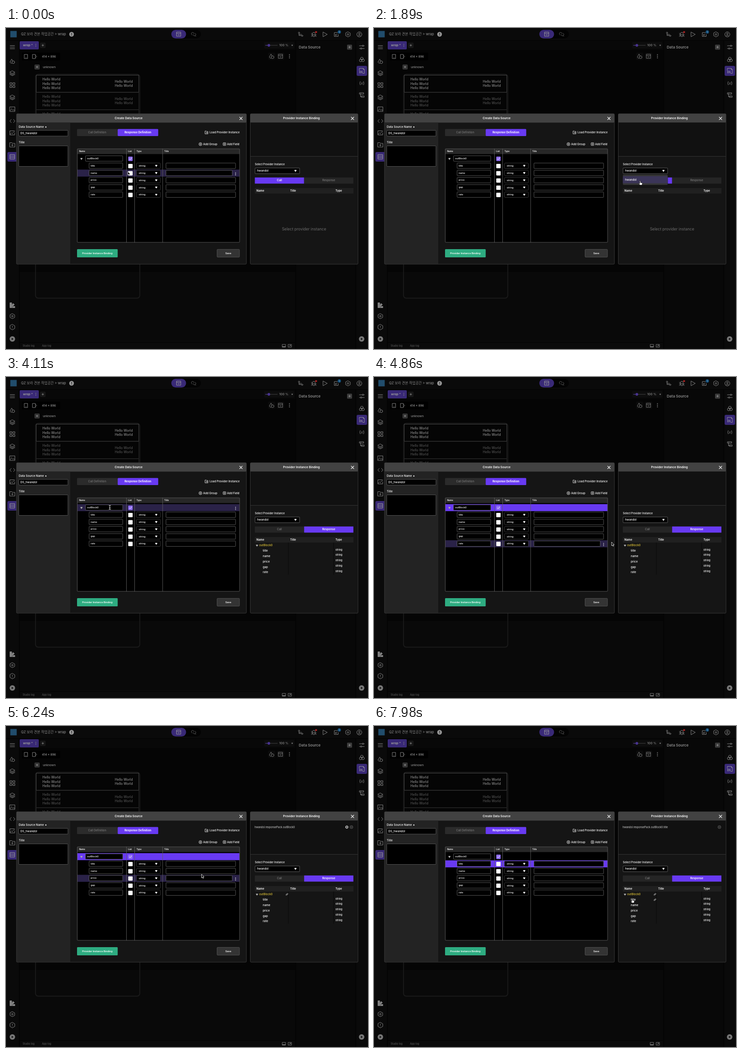
An HTML page for the animation above (8 s loop, 795 by 704 pixels).

```html
<!DOCTYPE html>
<html lang="ko">
<head>
<meta charset="utf-8">
<title>Data source binding</title>
<style>
  html, body { margin: 0; width: 100%; height: 100%; overflow: hidden; background: #070707; }
  svg { display: block; width: 100%; height: 100%; }
  text { font-family: Inter, "Noto Sans CJK KR", "Noto Sans CJK", sans-serif; white-space: pre; }
</style>
</head>
<body>
<svg id="stage" viewBox="0 0 795 704"></svg>
<script>
const stage = document.getElementById('stage');
const LOOP = 8000, STEP = 30, LAG = 60;
const PURPLE = '#683af2', DIM = '#392977', GREY = '#828282', EDGE = '#636363';
const NAME = 'hwandol';
const FIELDS = ['outBlock0', 'title', 'name', 'price', 'gap', 'rate'];

function el(tag, attrs, parent = stage) {
  const node = document.createElementNS('http://www.w3.org/2000/svg', tag);
  for (const k in attrs) node.setAttribute(k, attrs[k]);
  return parent.appendChild(node);
}
const group = (parent) => el('g', {}, parent);
const rect = (x, y, width, height, fill, o = {}, p) => el('rect', { x, y, width, height, fill, ...o }, p);
const circle = (cx, cy, r, fill, o = {}, p) => el('circle', { cx, cy, r, fill, ...o }, p);
const box = (x, y, w, h, fill, stroke, rx = 1, p) => rect(x, y, w, h, fill, { stroke, rx, 'stroke-width': .8 }, p);
const line = (d, stroke = GREY, w = 1, p) => el('path', {
  d, stroke, fill: 'none', 'stroke-width': w, 'stroke-linecap': 'round', 'stroke-linejoin': 'round' }, p);
const icon = (x, y, d, stroke = GREY, w = 1, p) => {
  const n = line(d, stroke, w, p);
  n.setAttribute('transform', `translate(${x} ${y})`);
  return n;
};
// cy is the middle of the capital letters
function text(x, cy, str, size, fill = '#fff', weight = 400, anchor = 'start', p) {
  const n = el('text', { x, y: cy + size * .364, fill, 'font-size': size, 'font-weight': weight, 'text-anchor': anchor }, p);
  n.textContent = str;
  return n;
}
const caretDown = (x, y, fill, p) => el('path', {
  d: 'M-1.6-.9H1.6L0 1.4Z', fill, stroke: fill, 'stroke-width': 1.6, 'stroke-linejoin': 'round',
  transform: `translate(${x} ${y})` }, p);
function dots(x, y, fill, gap, r, p) {
  for (const k of [-1, 0, 1]) circle(x, y + k * gap, r, fill, {}, p);
}
const show = (node, on) => node.setAttribute('visibility', on ? 'visible' : 'hidden');

const SHAPES = 'M-5 1.5L-1.5-5L1 0M5 2A3 3 0 1 1-1 2A3 3 0 1 1 5 2M-5 1.5A3 3 0 0 0-1.5 4.5';
const LAYERS = 'M0-5L5.5-2L0 1L-5.5-2ZM-5.5 .5L0 3.5L5.5 .5M-5.5 2.8L0 5.6L5.5 2.8';
const GEAR = 'M0-5.5L5-2.8V2.8L0 5.5L-5 2.8V-2.8ZM1.7 0A1.7 1.7 0 1 1-1.7 0A1.7 1.7 0 1 1 1.7 0';
const RING = 'M5.5 0A5.5 5.5 0 1 1-5.5 0A5.5 5.5 0 1 1 5.5 0';
const STORE = 'M-4.5-4.5H4.5V4.5H-4.5ZM-4.5-1.5H4.5M-1.5 1.5H1.5';
const PLUS = 'M-2 0H2M0-2V2';
const LINK = 'M-.3-.8L.8-1.9A1 1 0 0 1 2.2-.5L1 .7A1 1 0 0 1-.3 .7M.3 .8L-.8 1.9A1 1 0 0 1-2.2 .5L-1-.7A1 1 0 0 1 .3-.7';

function drawEditor() {
  rect(0, 0, 795, 704, '#0a0a0a');
  rect(30, 28, 605, 507, '#050505');
  rect(30, 28, 605, 20, '#080808');
  rect(30, 535, 605, 155, '#090909');
  rect(637, 28, 131, 676, '#080808');
  for (const x of [29, 636, 768]) rect(x - .5, 28, 1.5, 676, '#020202');
  rect(0, 27, 795, 1, '#020202');
  rect(30, 689, 605, 1, '#020202');

  // top bar
  rect(9.5, 6.5, 14, 14, '#214d6c');
  text(33, 13.5, 'QZ 보라 견본 작업공간 > wrap', 7.5, '#858585', 500);
  circle(144, 13.7, 5.2, '#969696');
  text(144, 13.8, '!', 8, '#111', 700, 'middle');
  rect(363, 4, 65, 19, '#030303', { rx: 9.5 });
  rect(363, 4, 32.5, 19, DIM, { rx: 9.5 });
  icon(379.3, 13.5, STORE, '#999');
  icon(412, 13.5, 'M1-1A3 3 0 1 0-3 2M-1 1A3 3 0 1 0 3-2M2.5 2.5L5 5', '#555');
  icon(647, 14, 'M-3.5-1.5V2.5H2M-3.5 0H2M-2-3.5A1.5 1.5 0 1 1-5-3.5A1.5 1.5 0 1 1-2-3.5M5 3A1.5 1.5 0 1 1 2 3A1.5 1.5 0 1 1 5 3');
  icon(676, 14, 'M-3-1.5A3 3 0 0 1 3-1.5V2A3 3 0 0 1-3 2ZM-5.5-2.5L-3-1M-5.5 4.5L-3 3M5.5 4.5L3 3M-5.5 1H5.5');
  circle(681, 9, 2.3, '#9c2020');
  icon(700.5, 14, 'M-4-5L5 0L-4 5Z');
  icon(726, 14, 'M2-4H-5V4.5H3.5V0M-2 2L1-1M-2.5 0V2H0');
  circle(732, 8.7, 3.6, '#12507e');
  text(732, 8.7, '1', 5, '#aaa', 500, 'middle');
  icon(751, 14, GEAR);
  icon(776, 14, RING + 'M1.8-1.3A1.8 1.8 0 1 1-1.8-1.3A1.8 1.8 0 1 1 1.8-1.3M-3.5 4C-2 1.5 2 1.5 3.5 4');

  // side bars
  icon(14, 42, 'M-5-3.5H5M-5 0H5M-5 3.5H5');
  icon(14, 73, SHAPES);
  icon(14, 99, LAYERS);
  icon(14, 125, 'M-5-5H-1V-1H-5ZM1.5-5H5.5V-1H1.5ZM-5 1.5H-1V5.5H-5ZM1.5 1.5H5.5V5.5H1.5Z');
  icon(14, 152, LAYERS);
  icon(14, 178, 'M-5.5-5H5.5V5H-5.5ZM-5 3L-1.5 0L1 2.5L3 1L5 3M-2-2H-1.5');
  icon(14, 204, 'M-2.5-3.5L-5.5 0L-2.5 3.5M2.5-3.5L5.5 0L2.5 3.5');
  icon(14, 230, 'M4-4.5H-5.5V4.5H5V0M-5 3L-1.5 0L1 2M1 0L5.5-4');
  icon(14, 256, 'M-5.5-4.5H-1L0-3H5.5V5H-5.5ZM-2 1H2M0-1V3');
  rect(3, 272, 23, 21, DIM, { rx: 3 });
  icon(14, 282.5, 'M-5-5H5V5H-5ZM-5-1.6H5M-5 1.7H5', '#9a9a9a');
  icon(14, 608, 'M-5-5.5H-1.5V5.5H-5ZM-.5-1.5L1.5-4L4.5-1.5L-.5 3.5ZM2 2.5H5.5V5.5H-.5Z').setAttribute('fill', GREY);
  icon(14, 632, GEAR);
  icon(14, 656, 'M0-6L5.2-3V3L0 6L-5.2 3V-3ZM0-2.5V.5M0 2.5V2.6');
  for (const x of [14, 781]) {
    circle(x, 682, 6, '#777');
    el('path', { d: `M${x - 1.5} 679.5L${x + 2.5} 682L${x - 1.5} 684.5Z`, fill: '#0a0a0a' });
  }
  icon(781.5, 42, 'M-5.5-3H1M4-3H5.5M-5.5 3H-3M0 3H5.5M4-3A1.5 1.5 0 1 1 1-3A1.5 1.5 0 1 1 4-3M0 3A1.5 1.5 0 1 1-3 3A1.5 1.5 0 1 1 0 3');
  icon(781.5, 69, 'M3-2A3 3 0 1 1-3-2A3 3 0 1 1 3-2M.5 2A3 3 0 1 1-5.5 2A3 3 0 1 1 .5 2M5.5 2A3 3 0 1 1-.5 2A3 3 0 1 1 5.5 2');
  rect(770, 83, 23, 22, DIM, { rx: 3 });
  icon(781.5, 94, 'M-5.5-1V-5.5H3L5.5-3V5.5H2M3-5.5V-3H5.5', '#9a9a9a', .9);
  text(779.5, 96.5, 'DS', 5.5, '#aaa', 600, 'middle');
  text(781.5, 120.5, '(𝑥)', 9, GREY, 500, 'middle');
  icon(781.5, 147, 'M-5-5H4V-2H-5ZM-1 2H5V5H-1ZM-3-2V3.5H-1M-3-3.5H-2.8M1 3.5H1.2');
  text(643, 42.2, 'Data Source', 8.1, '#8c8c8c', 600);
  rect(749, 36.5, 11, 11, '#3c3c3c', { rx: 1.5 });
  icon(754.5, 42, PLUS, '#999');

  // tabs and canvas tools
  rect(30, 29, 42, 18, DIM, { rx: 2 });
  text(37.5, 38, 'wrap *', 6.4, '#999', 700).setAttribute('font-style', 'italic');
  dots(65.5, 38, '#888', 2.5, .8);
  rect(75, 32, 12, 12, '#161616', { rx: 2 });
  icon(80.8, 38, PLUS, '#888');
  rect(567, 31, 66, 14, '#0d0d0d', { rx: 2 });
  line('M570 38H596', '#444', 1.2);
  line('M570 38H577', '#473290', 1.2);
  circle(577.3, 38, 2.9, '#48338f');
  text(600, 38, '100 %', 6.8, '#888', 500);
  caretDown(628.5, 38, '#777').setAttribute('transform', 'translate(628.5 38) scale(.7)');
  rect(35, 54, 84, 17, '#000', { rx: 2 });
  icon(44, 62.5, 'M-3.5-4.5H3.5V4.5H-3.5ZM-.5 2.7H.5');
  icon(62.5, 62.5, 'M-4-4.5H2V4.5H-4ZM3-2L5 0L3 2');
  text(79, 62.3, '414 × 896', 6.4, '#999', 500);
  for (const x of [583.5, 603]) rect(x - 8, 54, 16, 16, '#0b0b0b', { rx: 2 });
  icon(583.5, 62, SHAPES, GREY, .9);
  icon(603, 62, STORE, GREY, .9);
  dots(622.5, 62, '#8a8a8a', 3.4, 1);

  // phone preview
  rect(62.5, 80, 11.5, 11, '#343434', { rx: 2 });
  icon(68.2, 85.5, PLUS, '#999');
  text(81, 85.3, 'unknown', 6.4, '#8c8c8c', 500);
  rect(64.8, 101.5, 229, 491, 'none', { rx: 6, stroke: '#1a1a1a', 'stroke-width': 2 });
  [['#8d8d8d', '#4a4a4a'], ['#515151', '#2b2b2b'], ['#515151', '#2b2b2b']].forEach(([ink, edge], i) => {
    const y = 103.5 + 38 * i;
    rect(66.5, y, 225, 37.5, 'none', { stroke: edge, 'stroke-width': .9 });
    for (let k = 0; k < 3; k++) text(80, y + 9.4 + 9.2 * k, 'Hello World', 7.1, ink, 500);
    for (let k = 0; k < 2; k++) text(239, y + 14 + 9.2 * k, 'Hello World', 7.1, ink, 500);
  });

  text(36.5, 696.5, 'Studio log', 5.5, '#5e5e5e');
  text(79, 696.5, 'App log', 5.5, '#5e5e5e');
  icon(610.5, 697, 'M-3.5-3H3.5V3H-3.5ZM-3 1.5H3M-3 2.3H3', GREY, .9);
  icon(623.5, 697, 'M-3.5-3H3.5V3H-3.5ZM-1.5 1L1.5-1M.2-1.2H1.7V0', GREY, .9);
}

function drawModal(x, w, title, mid) {
  rect(x, 188, w, 330, '#151515', { rx: 2 });
  rect(x, 188, w, 19.5, '#424242', { rx: 2 });
  text(mid, 197.7, title, 6.5, '#fff', 600, 'middle');
  icon(x + w - 12, 198.3, 'M-2.9-2.9L2.9 2.9M2.9-2.9L-2.9 2.9', '#fff', 1.2);
}
const frameModal = (x, w) => rect(x, 188, w, 330, 'none', { rx: 2, stroke: '#3d3d3d', 'stroke-width': .9 });

const rowTop = i => 278.8 + 15.85 * i;
const rows = [];

function drawSourceModal() {
  drawModal(23, 505, 'Create Data Source', 269.3);
  rect(23, 207.5, 118, 310, '#232323');
  frameModal(23, 505);
  text(28, 216.7, 'Data Source Name', 6.2, '#fff', 500);
  circle(87.5, 217.2, 1.4, '#ddd');
  box(28, 224.5, 108, 12.5, '#000', EDGE);
  text(31.5, 230.8, 'DS_' + NAME, 6.2, '#fff', 500);
  text(28, 251, 'Title', 6.2, '#fff', 500);
  box(28, 258.5, 108, 45, '#000', EDGE);

  rect(156, 221.5, 89.5, 15.5, '#2b2b2b', { rx: 1.5 });
  rect(245.3, 221.5, 89, 15.5, PURPLE, { rx: 1.5 });
  text(200.3, 229, 'Call Definition', 6, '#858585', 400, 'middle');
  text(289.6, 229, 'Response Definition', 6, '#fff', 700, 'middle');
  icon(440.5, 229, 'M-3-3H-1L0-2H3V3.2H-3ZM-1 .7H1.4M.5-.4L1.5 .7L.5 1.7', '#fff', .8);
  text(513, 229, 'Load Provider Instance', 6, '#fff', 500, 'end');
  circle(427, 254.7, 3.3, 'none', { stroke: '#fff', 'stroke-width': .8 });
  icon(427, 254.7, 'M-1.5 0H1.5M0-1.5V1.5', '#fff', .8);
  text(433, 254.5, 'Add Group', 6, '#fff', 500);
  box(476.8, 251.6, 6, 6, 'none', '#fff');
  icon(479.8, 254.6, 'M-1.5 0H1.5M0-1.5V1.5', '#fff', .8);
  text(485.5, 254.5, 'Add Field', 6, '#fff', 500);

  rect(156.5, 265, 356.5, 205, '#000');
  rect(156.5, 265, 356.5, 11.5, '#272727');
  const backs = FIELDS.map((f, i) => rect(156.8, rowTop(i), 356, 15.4, PURPLE));
  for (const x of [264.5, 282.5, 344]) line(`M${x} 265V470`, '#606060', .9);
  box(156.5, 265, 356.5, 205, 'none', '#666');
  [[160.5, 'Name'], [268, 'List'], [286.5, 'Type'], [347.5, 'Title']].forEach(
    ([x, s]) => text(x, 270.6, s, 4.7, '#fff', 600));

  FIELDS.forEach((name, i) => {
    const y = rowTop(i) + 7.5, x = i ? 182.5 : 174.5;
    box(x, y - 6.1, 256.3 - x, 12, '#000', '#6c6c6c');
    const label = text(x + 3.6, y - .3, name, 5.25, '#fff', 500);
    const caret = rect(x + 4, y - 3.3, .7, 6.4, '#fff');
    rect(268.5, y - 4.2, 9.6, 9.6, i ? '#fff' : '#8e6cf6', { rx: 1.4 });
    const row = { back: backs[i], label, caret, more: group() };
    if (i) {
      box(286.5, y - 6, 52.5, 12, '#000', '#484848', 1.5);
      text(291.5, y - .1, 'string', 5.4, '#fff', 500);
      caretDown(330, y - .2, '#fff');
      row.input = box(351.3, y - 6, 152.8, 12, '#000', '#6c6c6c');
    } else {
      icon(273.3, y + .6, 'M-2.5 0L-.7 1.9L2.7-1.9', '#fff', 1);
      caretDown(165.7, y + .5, '#aaa');
    }
    dots(504.2, y + 1.9, '#fff', 2.6, .8, row.more);
    rows.push(row);
  });

  rect(156, 485, 89.3, 18, '#2eac81', { rx: 1.5 });
  text(200.6, 493.8, 'Provider Instance Binding', 5.4, '#fff', 600, 'middle');
  box(463.5, 485.4, 49.3, 17.2, '#343434', '#5a5a5a', 1.5);
  text(488.2, 493.8, 'Save', 5.4, '#fff', 600, 'middle');
}

const ui = {};
function drawTabs(active, p) {
  ['Call', 'Response'].forEach((s, i) => {
    const on = i === active, x = 546.5 + 108.2 * i;
    rect(x, 327.8, 108.2, 13.5, on ? PURPLE : '#252525', {}, p);
    text(x + 54, 334.3, s, 6, on ? '#fff' : '#8a8a8a', on ? 600 : 400, 'middle', p);
  });
}
function drawBound(path, gear) {
  const g = group();
  text(546, 221.7, path, 5.5, '#d8d8d8', 400, 'start', g);
  circle(758.6, 221.7, 3.2, 'none', { stroke: '#888', 'stroke-width': .7 }, g);
  icon(758.6, 221.7, 'M-1.1-1.1L1.1 1.1M1.1-1.1L-1.1 1.1', '#888', .7, g);
  if (gear) {
    circle(748.5, 221.7, 2.2, 'none', { stroke: '#bbb', 'stroke-width': 1.7 }, g);
    circle(748.5, 221.7, 3.1, 'none', { stroke: '#bbb', 'stroke-width': .8, 'stroke-dasharray': '1.2 1.23' }, g);
  }
  return g;
}
function drawProviderModal() {
  drawModal(536.5, 236.5, 'Provider Instance Binding', 648.8);
  rect(537, 207.5, 235.5, 74, '#111');
  rect(537, 281, 235.5, .9, '#383838');
  frameModal(536.5, 236.5);
  text(546.5, 298.7, 'Select Provider Instance', 5.65, '#fff', 500);
  box(547, 307, 97.8, 12.6, '#000', '#707070');
  text(551.3, 313, NAME, 6.2, '#fff', 500);
  caretDown(635.7, 313, '#fff');
  rect(546.5, 351, 216.5, 12, '#202020');
  [[550, 'Name'], [624, 'Title'], [723.5, 'Type']].forEach(([x, s]) => text(x, 357, s, 6, '#fff', 600));

  ui.call = group();
  drawTabs(0, ui.call);
  text(654.5, 440.5, 'Select provider instance', 8.5, '#6d6d6d', 400, 'middle', ui.call);

  ui.response = group();
  drawTabs(1, ui.response);
  for (const x of [620, 719.5]) line(`M${x} 363.5V433`, '#080808', 1, ui.response);
  FIELDS.forEach((s, i) => {
    text(i ? 564 : 556, 369.2 + 11.8 * i, s, 6.2, i ? '#fff' : '#ffdf3c', i ? 500 : 400, 'start', ui.response);
    if (i) text(723.5, 366.6 + 11.9 * i, 'string', 5.5, '#fff', 500, 'start', ui.response);
  });
  caretDown(551.2, 369.4, '#aaa', ui.response);
  ui.links = [0, 1].map(i => icon(617, 369.2 + 11.8 * i, LINK, '#c8c8c8', .8));
  ui.bound = [drawBound(NAME + '.responsePack.outBlock0', true), drawBound(NAME + '.responsePack.outBlock0.title')];

  ui.menu = group();
  rect(546.5, 321.5, 98.5, 22.8, '#363636', { rx: 1.5, stroke: '#1a1a1a', 'stroke-width': .6 }, ui.menu);
  rect(546.8, 325, 98, 15.5, '#3b3558', {}, ui.menu);
  text(551.3, 332.5, NAME, 6.2, '#fff', 500, 'start', ui.menu);
}

function drawCursors() {
  ui.pointer = group();
  ui.arrow = el('path', { d: 'M0 0V8L1.8 6.4L3.1 9.2L4.4 8.6L3.2 5.9H5.6Z', fill: '#000', stroke: '#fff', 'stroke-width': .8 }, ui.pointer);
  ui.hand = el('path', {
    d: 'M-.8 0A.9 .9 0 0 1 1 0V3L4.2 3.8Q5 4.2 4.8 5.2L4 8.5H-.4L-3 5.2Q-2.6 4-.8 5.3Z',
    fill: '#fff', stroke: '#000', 'stroke-width': .7 }, ui.pointer);
  ui.beam = group(ui.pointer);
  const d = 'M-1.8-4.7Q0-4.7 0-3.5Q0-4.7 1.8-4.7M0-3.5V3.5M-1.8 4.7Q0 4.7 0 3.5Q0 4.7 1.8 4.7M-1 .8H1';
  line(d, '#000', 1.8, ui.beam);
  line(d, '#fff', .9, ui.beam);
}

// pointer path: time, x, y
const PATH = [
  [0, 267.5, 314.5], [210, 345, 318], [480, 520, 323], [780, 589, 323], [960, 589, 323],
  [1170, 588, 300], [1350, 587, 312], [1500, 587, 313], [1770, 585, 330], [1890, 584.5, 336],
  [2520, 584.5, 338], [2880, 683, 337], [3330, 682.7, 337], [3480, 610, 350], [3690, 430, 336],
  [3900, 290, 300], [4110, 228, 286], [4500, 234, 287], [4710, 395, 345], [4800, 482, 360],
  [4860, 521.8, 362], [5100, 560, 366], [5400, 566, 368], [5880, 566, 369], [6090, 528, 351],
  [6240, 429.5, 325], [6420, 275, 307], [6600, 200, 302], [6870, 202, 303], [7080, 407.5, 332],
  [7260, 545, 362], [7530, 567, 379], [8000, 567, 379.5]
];
const CLICK = { open: 1410, pick: 2280, tab: 3000, group: 4260, bind: 5700, field: 6720, bindField: 7740 };

const slope = (i, k) => (PATH[i + 1][k] - PATH[i][k]) / (PATH[i + 1][0] - PATH[i][0]);
function tangent(i, k) {
  if (i === 0 || i === PATH.length - 1) return 0;
  const a = slope(i - 1, k), b = slope(i, k);
  return a * b > 0 ? 2 * a * b / (a + b) : 0;
}
function pointerAt(t) {
  t = Math.max(0, t);
  let i = 0;
  while (i < PATH.length - 2 && t >= PATH[i + 1][0]) i++;
  const span = PATH[i + 1][0] - PATH[i][0], u = (t - PATH[i][0]) / span;
  return [1, 2].map(k => {
    const a = PATH[i][k], b = PATH[i + 1][k];
    const ease = u * u * (3 - 2 * u);
    return a + (b - a) * ease + span * u * (1 - u) * ((1 - u) * tangent(i, k) - u * tangent(i + 1, k));
  });
}
const rowAt = ([x, y]) => x > 156.5 && x < 513 ? Math.floor((y - 278.8) / 15.85) : -1;

function shapeAt([x, y], t) {
  if (t >= CLICK.open && t < CLICK.pick && y > 321 && x > 546) return 'hand';
  if (t >= CLICK.tab && x > 546 && x < 620 && y > 363 && y < 433) return 'hand';
  const i = rowAt([x, y]);
  if (i < 0 || i > 5) return 'arrow';
  const inField = Math.abs(y - rowTop(i) - 7.5) < 6.1;
  const inName = x > (i ? 182 : 174) && x < 256.5;
  return inField && (inName || (i && x > 351 && x < 497)) ? 'beam' : 'arrow';
}

function render(t) {
  const pos = pointerAt(t), hover = rowAt(pointerAt(t - LAG));
  const picked = t >= CLICK.field ? 1 : t >= CLICK.group ? 0 : -1;
  rows.forEach((row, i) => {
    const over = i === hover, on = i === picked;
    show(row.back, over || on);
    row.back.setAttribute('fill', on ? PURPLE : '#2a2248');
    show(row.more, over);
    if (row.input) row.input.setAttribute('width', over ? 145.5 : 152.8);
    const since = t - (i ? CLICK.field : CLICK.group);
    const focused = on && t < (i ? CLICK.bindField : CLICK.bind);
    show(row.caret, focused && Math.floor(since / 530) % 2 === 0);
    if (focused) row.caret.setAttribute('x', +row.label.getAttribute('x') + row.label.getComputedTextLength() + .2);
  });
  show(ui.menu, t >= CLICK.open && t < CLICK.pick);
  show(ui.call, t < CLICK.tab);
  show(ui.response, t >= CLICK.tab);
  show(ui.links[0], t >= CLICK.bind);
  show(ui.links[1], t >= CLICK.bindField);
  show(ui.bound[0], t >= CLICK.bind && t < CLICK.field);
  show(ui.bound[1], t >= CLICK.bindField);
  const shape = shapeAt(pos, t);
  for (const s of ['arrow', 'hand', 'beam']) show(ui[s], s === shape);
  ui.pointer.setAttribute('transform', `translate(${pos[0].toFixed(2)} ${pos[1].toFixed(2)})`);
}

drawEditor();
drawSourceModal();
drawProviderModal();
drawCursors();
const start = performance.now();
function tick() {
  const t = (performance.now() - start) % LOOP;
  render(Math.floor(t / STEP) * STEP);
  requestAnimationFrame(tick);
}
tick();
</script>
</body>
</html>
```
